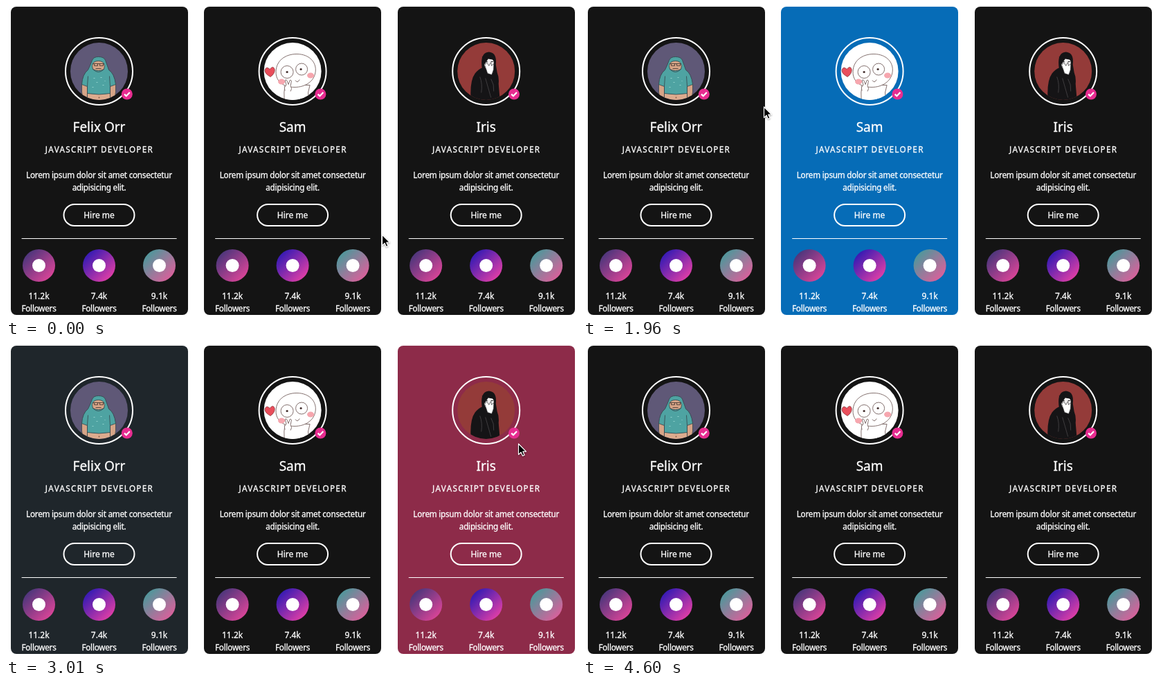
An HTML page for the animation above (4.77 s loop, 825 by 450 pixels).

```html
<!DOCTYPE html>
<html lang="en">
<head>
<meta charset="utf-8">
<title>Profile cards</title>
<style>
  html, body { margin: 0; width: 100%; height: 100%; overflow: hidden; background: #fff; }
  svg { display: block; width: 825px; height: 450px; }
  text { font-family: "Noto Sans", "Open Sans", sans-serif; font-size: 12px; fill: #fff;
    stroke: #fff; stroke-width: .3px; text-anchor: middle; }
  .name { font-size: 19px; }
  .role { font-size: 11.7px; letter-spacing: 1.3px; }
  .copy { font-size: 11.7px; letter-spacing: -.23px; }
</style>
</head>
<body>
<svg id="stage" viewBox="0 0 825 450" xmlns="http://www.w3.org/2000/svg">
  <defs>
    <clipPath id="round"><circle r="41.5"/></clipPath>
    <linearGradient id="g0" x1=".1" y1=".1" x2=".9" y2=".9">
      <stop stop-color="#46357a"/><stop offset="1" stop-color="#df4599"/>
    </linearGradient>
    <linearGradient id="g1" x1=".1" y1=".1" x2=".9" y2=".9">
      <stop stop-color="#2d19b4"/><stop offset="1" stop-color="#e63fa6"/>
    </linearGradient>
    <linearGradient id="g2" x1=".1" y1=".1" x2=".9" y2=".9">
      <stop stop-color="#489a9b"/><stop offset="1" stop-color="#df5e9b"/>
    </linearGradient>
  </defs>
  <g id="cards"></g>
  <path id="cursor" d="M0 0V15.6L3.6 12.2L6 17.4L8.6 16.2L6.3 11.2H11Z"
    fill="#000" stroke="#fff" stroke-width="1.2" stroke-linejoin="round"
    style="filter:drop-shadow(0 1px 1px rgba(0,0,0,.35))"/>
</svg>
<script>
const LOOP = 4770, FADE = 400;
const LEFT = 6.6, PITCH = 279.6, MID = 127.9;
const DARK = [20, 20, 20];

const hooded = `
  <rect x="-42" y="-42" width="84" height="84" fill="#5f5877"/>
  <g stroke="#34434a" stroke-width=".8">
    <path d="M-25 18L-17 20V42H-23Q-26 30-25 18ZM24 18L16 20V42H22Q25 30 24 18Z" fill="#d6a487"/>
    <path d="M-17 43V31H16V43Z" fill="#dcab8e"/>
    <path d="M-10-16Q-8-21-1-21Q7-21 9-16Q12-8 14-2Q22 3 24 19L16 22V32Q0 35-17 32V22L-25 19Q-24 4-16-2Q-13-8-10-16Z" fill="#4ea3a2"/>
    <path d="M-10-8Q-9-15-1-15Q7-15 8-8L7-3Q-1 1-9-3Z" fill="#d6a487"/>
    <path d="M-9-11H7M-7-11V-8H-2V-11M1-11V-8H6V-11M-5-4H3" fill="none" stroke="#3b302d"/>
    <path d="M-9-3Q-1 5 7-3M-16 7L-17 22M15 7L16 22" fill="none"/>
  </g>
  <path d="M-8 10h2M2 9h2M8 14h1M-4 16h2M5 20h2M-10 23h2" stroke="#8fd0cb"/>
  <circle cy="38" r=".9" fill="#7c5744"/>`;

const doodle = `
  <rect x="-42" y="-42" width="84" height="84" fill="#fff"/>
  <g fill="#fff" stroke="#75605e" stroke-width=".9">
    <path d="M-12 42Q-13 30-11 20H25Q21 30 23 42"/>
    <path d="M-24 3C-25-15-11-25 6-25C24-25 35-13 33 1C31 15 18 23 3 23C-12 23-23 16-24 3Z"/>
    <circle cx="-8" cy="1" r="9"/>
    <circle cx="13" cy="-3" r="8.5"/>
    <path d="M4 13Q7 18 10 12" fill="none"/>
    <path d="M-11 28Q-13 22-9 20L-11 13Q-9 11-8 14L-6 19L-4 13Q-1 12-2 16L-3 21Q0 25-3 29"/>
  </g>
  <g fill="#f6a6ae"><ellipse cx="-16" cy="15" rx="5" ry="4"/><ellipse cx="26" cy="6" rx="5" ry="4"/></g>
  <g fill="#45302f"><circle cx="-8" cy="1" r="1.6"/><circle cx="12" cy="-3" r="1.6"/></g>
  <path d="M-32 8Q-41 3-40-2Q-38-8-33-3Q-28-9-26-3Q-25 3-32 8Z" fill="#e94e5b" stroke="#8b393f" stroke-width=".8"/>`;

const shy = `
  <rect x="-42" y="-42" width="84" height="84" fill="#943b39"/>
  <path d="M-22 42Q-24 14-16 3Q-11-3-6-5Q-9-27 4-28Q16-27 14-10L16 2Q19 9 18 18L20 42Z" fill="#151416"/>
  <path d="M-3-12Q-1-20 5-19Q12-18 11-9Q10-1 5 0Q-3-4-3-12Z" fill="#f1efef"/>
  <path d="M-6-21Q5-26 9-17L3-18L-3-9Z" fill="#151416"/>
  <path d="M-2-9L1-13L4-8L7-13L8-8L11-11Q12-2 8 5L2 3Z" fill="#fff" stroke="#313033" stroke-width=".7"/>
  <path d="M-1-14h3M7-14h3" stroke="#252427"/>
  <path d="M-9 8Q-5 18-7 31M-1 10L7 38M7 11Q12 19 11 29" fill="none" stroke="#4a474a" stroke-width=".8"/>`;

const people = [
  { name: "Felix Orr", art: hooded, tint: [77, 110, 136], enter: 1960, leave: 2810 },
  { name: "Sam",       art: doodle, tint: [6, 108, 183],  enter: 1130, leave: 2050 },
  { name: "Iris",      art: shy,    tint: [255, 64, 123], enter: 2890, leave: 3710, snap: true }
];

// Pointer: start time, then tip position; no position hides it.
const pointer = [
  [0, 543, 331], [720, 543, 311], [900, 543, 237], [1070, 543, 152],
  [1250, 478, 145], [1430, 476, 146], [1600, 476, 146], [1780, 458, 146],
  [1960, 261, 146], [2130, 180, 146], [2310, 175, 146], [2480, 175, 146],
  [2660, 185, 146], [2830, 763, 146], [3010, 740, 143], [3180, 740, 143],
  [3360, 740, 143], [3710, 740, 143], [3890, 740, 143], [4070, 740, 143],
  [4250], [4420], [4600]
];

const label = (x, y, str, cls = "") => `<text x="${x}" y="${y}" class="${cls}">${str}</text>`;

const stat = (count, i) => {
  const x = MID + 87 * (i - 1);
  return `<circle cx="${x}" cy="375.5" r="23.5" fill="url(#g${i})"/>
    <circle cx="${x}" cy="375.5" r="9.5" fill="#fff"/>
    ${label(x, 424, count)}${label(x, 442, "Followers", "copy")}`;
};

// The back panel sits on whole pixels; the content keeps its fractional offset.
const card = (p, i) => {
  const x = LEFT + PITCH * i;
  return `<rect class="back" x="${Math.round(x)}" y="1" width="256" height="446" rx="8"/>
  <g transform="translate(${x})">
    <g transform="translate(${MID} 94.5)">
      <g clip-path="url(#round)">${p.art}</g>
      <circle r="48.5" fill="none" stroke="#fff" stroke-width="2"/>
    </g>
    <circle cx="168.2" cy="127.5" r="8" fill="#e72c90"/>
    <path d="M164.4 127.6L167.2 130.3L172.2 125" fill="none" stroke="#fff" stroke-width="2.2"/>
    ${label(MID, 182, p.name, "name")}
    ${label(MID + .5, 212, "JAVASCRIPT DEVELOPER", "role")}
    ${label(MID, 249, "Lorem ipsum dolor sit amet consectetur", "copy")}
    ${label(MID, 267, "adipisicing elit.", "copy")}
    <rect x="${MID - 51}" y="287" width="102" height="31" rx="15.5" fill="none" stroke="#fff" stroke-width="2"/>
    ${label(MID, 307, "Hire me")}
    <path d="M16 336.5H240" stroke="#fff"/>
    ${["11.2k", "7.4k", "9.1k"].map(stat).join("")}
  </g>`;
};

document.getElementById("cards").innerHTML = people.map(card).join("");
const backs = document.querySelectorAll(".back");
const cursor = document.getElementById("cursor");

// CSS "ease": cubic-bezier(.25, .1, .25, 1)
function ease(u) {
  if (u <= 0) return 0;
  if (u >= 1) return 1;
  const bez = (a, b, s) => 3 * a * s * (1 - s) ** 2 + 3 * b * s * s * (1 - s) + s ** 3;
  let lo = 0, hi = 1;
  for (let i = 0; i < 20; i++) {
    const mid = (lo + hi) / 2;
    if (bez(.25, .25, mid) < u) lo = mid; else hi = mid;
  }
  return bez(.1, 1, lo);
}

function hover(p, t) {
  const out = p.snap ? +(t >= p.leave) : ease((t - p.leave) / FADE);
  return ease((t - p.enter) / FADE) * (1 - out);
}

function draw(time) {
  const now = time % LOOP;
  const [t, x, y] = pointer.findLast(step => step[0] <= now);
  people.forEach((p, i) => {
    const k = hover(p, t);
    const rgb = DARK.map((c, j) => Math.round(c + (p.tint[j] - c) * k));
    backs[i].setAttribute("fill", `rgb(${rgb})`);
  });
  cursor.setAttribute("visibility", x === undefined ? "hidden" : "visible");
  if (x !== undefined) cursor.setAttribute("transform", `translate(${x + .5} ${y})`);
}

const start = performance.now();
function tick() {
  draw(performance.now() - start);
  requestAnimationFrame(tick);
}
tick();
</script>
</body>
</html>
```
